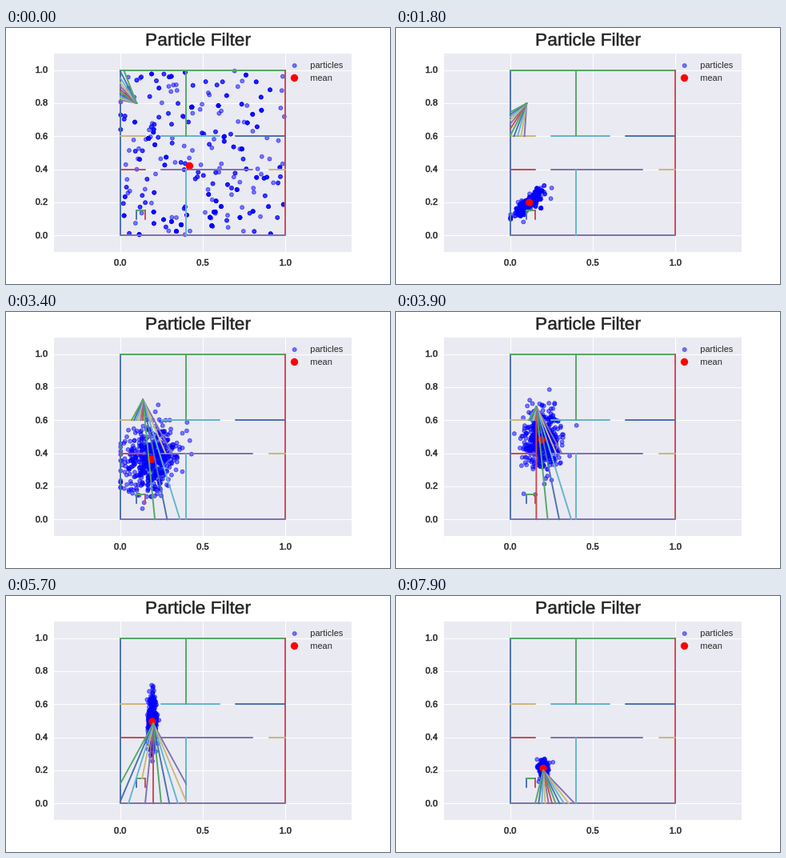
Recreate the animation shown at these times as an HTML page. Size 480 px wide and 320 px high, loop 8000 ms.

```html
<!DOCTYPE html>
<html lang="en">
<head>
<meta charset="utf-8">
<title>Particle Filter</title>
<style>
  html, body { margin: 0; width: 100%; height: 100%; overflow: hidden; background: #fff; }
  svg { display: block; width: 480px; height: 320px; }
  text { font: 11px "Liberation Sans", Arial, sans-serif; fill: #262626; }
  .strong { stroke: #262626; stroke-width: .55px; }
  .title { font-size: 22.6px; }
  .dot { fill: #00f; fill-opacity: .5; stroke: #00f; stroke-opacity: .5; stroke-width: 1px; }
  .mean { fill: #f00; }
  .line { stroke-width: 1.94px; stroke-linecap: round; }
  .grid { stroke: #fff; stroke-width: 1px; }
</style>
</head>
<body>
<svg id="stage" viewBox="0 0 480 320"></svg>
<script>
const stage = document.getElementById('stage');
const SCALE = 372 / 1.8;
const px = x => 60 + (x + 0.4) * SCALE;
const py = y => 280 - (y + 0.1) * SCALE;

function add(tag, attrs, text) {
  const el = document.createElementNS('http://www.w3.org/2000/svg', tag);
  for (const name in attrs) el.setAttribute(name, attrs[name]);
  if (text) el.textContent = text;
  return stage.appendChild(el);
}
function setAttrs(el, attrs) {
  for (const name in attrs) el.setAttribute(name, attrs[name].toFixed(2));
}

const PALETTE = ['#4C72B0', '#55A868', '#C44E52', '#8172B2', '#CCB974', '#64B5CD'];
const RAYS = 11, COUNT = 500, SLOTS = 280;
const STEP = 100, FRAMES = 80, LEG = 25, LOCKED = 45;

// Floor plan
const walls = [];
function chain(...points) {
  for (let i = 1; i < points.length; i++) walls.push([...points[i - 1], ...points[i]]);
}
function row(y, ...ends) {
  for (let i = 0; i < ends.length; i += 2) chain([ends[i], y], [ends[i + 1], y]);
}
chain([0, 0], [0, 1], [1, 1], [1, 0], [0, 0]);
row(.6, 0, .15, .25, .6, .7, 1);
chain([.4, .6], [.4, 1]);
row(.4, 0, .15, .25, .8, .9, 1);
chain([.4, 0], [.4, .4]);
chain([.1, .1], [.1, .15], [.15, .15], [.15, .1]);

const clamp = t => Math.min(1, Math.max(0, t));
const mix = (a, b, t) => a + (b - a) * t;
const bump = t => Math.sin(Math.PI * clamp(t));

function rand(a, b = 0, c = 0) {
  let h = Math.imul(a + 1, 374761393) ^ Math.imul(b + 7, 668265263) ^ Math.imul(c + 13, 1274126177);
  h = Math.imul(h ^ h >>> 15, 2246822519);
  h = Math.imul(h ^ h >>> 13, 3266489917);
  return ((h ^ h >>> 16) >>> 0) / 4294967296;
}
const gauss = (a, b, c) =>
  Math.sqrt(-2 * Math.log(rand(a, b, c) + 1e-9)) * Math.cos(2 * Math.PI * rand(a, b, c + 50));

// Turn, walk to the gap, walk down, turn again
function robotAt(frame) {
  const t = frame % LEG / (LEG - 1);
  switch (Math.floor(frame / LEG)) {
    case 0: return { x: .1, y: .8, heading: mix(140, 270, t) };
    case 1: return { x: mix(.1, .2, t), y: mix(.8, .6, t), heading: 270 };
    case 2: return { x: .2, y: mix(.6, .2, t), heading: 270 };
    default: return { x: .2, y: .2, heading: mix(270, 360, t) };
  }
}

// The cloud settles on a wrong guess, spreads out while searching, then follows the robot
function cloudAt(frame) {
  const scatter = Math.exp(-frame / 5);
  const search = clamp((frame - 22) / (LOCKED - 22));
  const follow = clamp((frame - LOCKED) / (FRAMES - 1 - LOCKED));
  const robot = robotAt(Math.max(frame, LOCKED));
  const found = Math.pow(search, 1.5);
  return {
    x: mix(.108 + .312 * scatter, robot.x - .008 * (1 - follow), found) + .055 * bump(search),
    y: mix(.193 + .227 * scatter, robot.y + .012, found),
    spreadX: mix(.036, .011, search) + .2 * scatter + .05 * bump(search),
    shear: .033 * (1 - search),
    spreadY: mix(mix(.014, .052, search), .02, follow) + .2 * scatter
      + .06 * bump(search) + .035 * bump(follow * 1.5)
  };
}

function particleAt(id, frame, cloud) {
  if (frame < 9 && rand(id, 3) < Math.exp(-frame / 2.2)) return [rand(id, 1), rand(id, 2)];
  // Each particle is redrawn after a few frames, at its own phase
  const life = Math.floor((frame + id % 4) / 4);
  const tail = rand(id, life, 9) > .94 ? 1.7 : 1;
  const a = gauss(id, life, 1), b = gauss(id, life, 2);
  return [
    Math.max(.003, cloud.x + cloud.spreadX * a * tail),
    Math.max(.005, cloud.y + cloud.shear * a + cloud.spreadY * b * tail)
  ];
}

function castRay(x, y, angle) {
  const dx = Math.cos(angle), dy = Math.sin(angle);
  let nearest = 2;
  for (const [x1, y1, x2, y2] of walls) {
    const wx = x2 - x1, wy = y2 - y1, det = dx * wy - dy * wx;
    if (Math.abs(det) < 1e-9) continue;
    const dist = ((x1 - x) * wy - (y1 - y) * wx) / det;
    const along = ((x1 - x) * dy - (y1 - y) * dx) / det;
    if (dist > 1e-6 && along >= 0 && along <= 1) nearest = Math.min(nearest, dist);
  }
  return [x + dx * nearest, y + dy * nearest];
}

// Axes, snapped to whole pixels
add('rect', { width: 480, height: 320, fill: '#fff' });
add('rect', { x: 60, y: 32, width: 372, height: 248, fill: '#EAEAF2' });
for (let v = 0; v <= 1; v += .5) {
  const x = Math.round(px(v)) + .5;
  add('line', { x1: x, x2: x, y1: 32, y2: 280, class: 'grid' });
  add('text', { x: px(v), y: 296.5, 'text-anchor': 'middle', class: 'strong' }, v.toFixed(1));
}
for (let i = 0; i <= 5; i++) {
  const y = Math.round(py(i / 5)) + .5;
  add('line', { x1: 60, x2: 432, y1: y, y2: y, class: 'grid' });
  add('text', { x: 52, y: py(i / 5) + 3.4, 'text-anchor': 'end', class: 'strong' }, (i / 5).toFixed(1));
}
add('text', { x: 240, y: 22.3, 'text-anchor': 'middle', class: 'strong title' }, 'Particle Filter');

// Moving parts, with the walls drawn above the cloud
const addDot = attrs => add('circle', { r: 2.5, class: 'dot', ...attrs });
const addMean = attrs => add('circle', { r: 4.7, class: 'mean', ...attrs });
const addLine = (i, attrs) => add('line', { class: 'line', stroke: PALETTE[i % PALETTE.length], ...attrs });

const dots = Array.from({ length: COUNT }, () => addDot());
const slots = dots.map((_, i) => Math.floor(SLOTS * Math.pow(rand(i, 77), 2)));
const mean = addMean();
walls.forEach(([x1, y1, x2, y2], i) => addLine(i, {
  x1: Math.round(px(x1)), y1: Math.round(py(y1)),
  x2: Math.round(px(x2)), y2: Math.round(py(y2))
}));
const rays = Array.from({ length: RAYS }, (_, i) => addLine(walls.length + i));

// Legend
addDot({ cx: 360.7, cy: 47 });
add('text', { x: 380.3, y: 50 }, 'particles');
addMean({ cx: 360.5, cy: 62.5 });
add('text', { x: 380.3, y: 66 }, 'mean');

function draw(frame) {
  const cloud = cloudAt(frame);
  dots.forEach((dot, i) => {
    const [x, y] = particleAt(frame < LEG ? slots[i] : i, frame, cloud);
    setAttrs(dot, { cx: px(x), cy: py(y) });
  });
  setAttrs(mean, { cx: px(cloud.x), cy: py(cloud.y) });

  const { x, y, heading } = robotAt(frame);
  rays.forEach((ray, i) => {
    const [ex, ey] = castRay(x, y, heading * Math.PI / 180 + .5 - i * .1);
    setAttrs(ray, { x1: px(x), y1: py(y), x2: px(ex), y2: py(ey) });
  });
}

const start = performance.now();
let shown = -1;
function tick() {
  const frame = Math.floor((performance.now() - start) / STEP) % FRAMES;
  if (frame !== shown) draw(shown = frame);
  requestAnimationFrame(tick);
}
tick();
</script>
</body>
</html>
```
